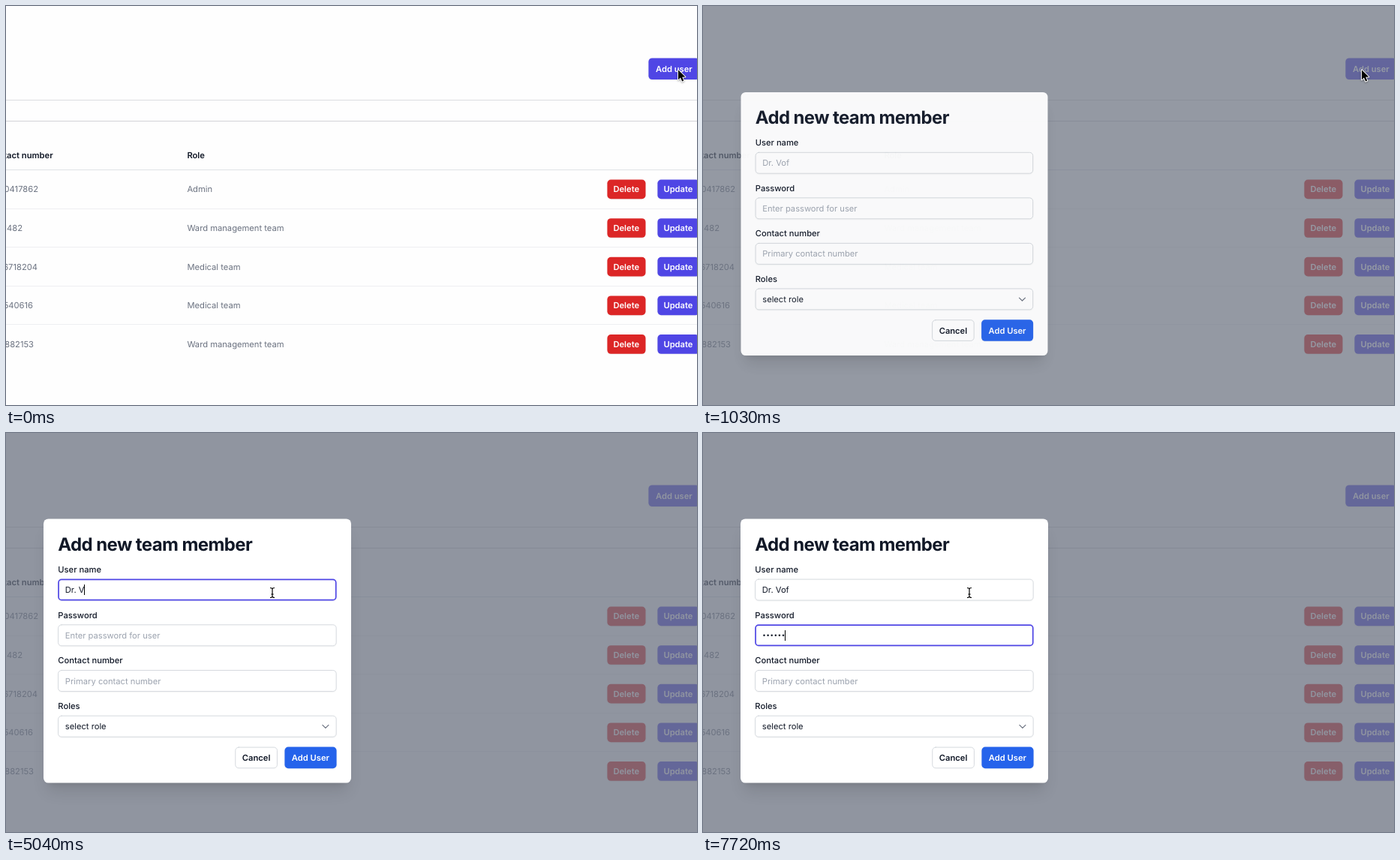
These frames come from a looping animation (921x532 px, 8 s). An HTML page with a canvas:

```html
<!DOCTYPE html>
<html lang="en">
<head>
<meta charset="utf-8">
<title>Add team member</title>
<style>
  html, body { margin: 0; width: 100%; height: 100%; overflow: hidden; background: #fefefe; }
  canvas { display: block; width: 921px; height: 532px; }
</style>
</head>
<body>
<canvas id="stage"></canvas>
<script>
const W = 921, H = 532, LOOP = 8000;
const dpr = window.devicePixelRatio || 1;
const INK = '#111827', MUTED = '#6b7280', HINT = '#9ca3af', EDGE = '#d1d5db';
const INDIGO = '#4f46e5', HOVER = '#6366f1', RED = '#dc2626', BLUE = '#2563eb';
const PAPER = '#fefefe';
const NAME = 'Dr. Vof';

const stage = document.getElementById('stage');
const layer = document.createElement('canvas');
for (const c of [stage, layer]) {
  c.width = Math.round(W * dpr);
  c.height = Math.round(H * dpr);
}
const view = stage.getContext('2d');
const sheet = layer.getContext('2d');
let g = view;

const rows = [
  ['70417862', 43, 'Admin'],
  ['1482', 22, 'Ward management team'],
  ['6718204', 42, 'Medical team'],
  ['2540616', 36, 'Medical team'],
  ['9882153', 37, 'Ward management team']
];

// Each track is [time, value]; the value holds until the next time.
const hoverOn = [[0, false], [140, true], [880, false]];
const opening = [[0, 0], [880, 0.66], [1030, 0.95], [1180, 1]];
const pointer = [
  [0, [896, 85.2]], [140, [891, 87]], [290, [882, 86]], [440, [878, 85.2]],
  [1180, [862, 92]], [1330, [735, 140]], [1480, [545, 198]], [1620, [410, 227]],
  [1770, [359, 231]], [1920, [357, 219]], [2070, [356, 215]], [2220, [355, 213]]
];
const nameLength = [[0, 0], [3410, 1], [3710, 2], [3860, 3], [4900, 4], [5040, 5], [5340, 6], [5640, 7]];
const dotCount = [[0, 0], [6530, 1], [6680, 2], [7120, 3], [7270, 4], [7720, 6]];
const focused = [[0, -1], [2520, 0], [5940, 1]];
const caretOn = [
  [0, false], [2520, true], [3120, false], [3410, true], [4300, false],
  [4900, true], [6380, false], [6530, true]
];

function at(track, t) {
  let value = track[0][1];
  for (const [time, v] of track) if (t >= time) value = v;
  return value;
}

function text(str, x, y, color, weight = 400, size = 11.2, align = 'left', spacing = 0) {
  g.font = `${weight} ${size}px Inter, "Liberation Sans", sans-serif`;
  g.letterSpacing = spacing + 'px';
  g.textAlign = align;
  g.fillStyle = color;
  g.fillText(str, x, y);
  return g.measureText(str).width;
}

function box(x, y, w, h, r, fill) {
  g.beginPath();
  g.roundRect(x, y, w, h, r);
  g.fillStyle = fill;
  g.fill();
}

// Border drawn inside the box edge.
function ring(x, y, w, h, r, width, color) {
  g.beginPath();
  g.roundRect(x + width / 2, y + width / 2, w - width, h - width, r - width / 2);
  g.lineWidth = width;
  g.strokeStyle = color;
  g.stroke();
}

function shadow(color, blur, dy) {
  g.shadowColor = color;
  g.shadowBlur = blur * dpr;
  g.shadowOffsetY = dy * dpr;
}

function rule(y, h, color) {
  g.fillStyle = color;
  g.fillRect(0, y, W, h);
}

function button(x, y, w, h, fill, label, textX, baseline) {
  g.save();
  shadow('rgba(0,0,0,.06)', 1.6, 0.8);
  box(x, y, w, h, 4.8, fill);
  g.restore();
  text(label, textX, baseline, '#fff', 600);
}

function drawPage(t) {
  g.fillStyle = PAPER;
  g.fillRect(0, 0, W, H);
  button(856.4, 69.4, 67.6, 28.7, at(hoverOn, t) ? HOVER : INDIGO, 'Add user', 866, 88);
  rule(125, 1, '#dcdde1');
  rule(153, 1, '#d2d3d8');
  text('Contact number', 62.6, 203, INK, 600, 11.2, 'right');
  text('Role', 241.4, 203, INK, 600);
  rule(218, 0.8, '#d8dbe0');
  rows.forEach(([phone, right, role], i) => {
    const y = 244.4 + i * 51.65;
    text(phone, right, y + 4, MUTED, 400, 11.2, 'right');
    text(role, 241.4, y + 4, MUTED);
    button(801.4, y - 12.9, 51.1, 25.7, RED, 'Delete', 809.4, y + 4);
    button(868.4, y - 12.9, 55.6, 25.7, INDIGO, 'Update', 876.4, y + 4);
    if (i < 4) rule(Math.floor(y + 25.6), 1, '#eeeff2');
  });
}

function drawField(i, label, active) {
  const y = 194.6 + i * 60.7;
  text(label, 69.3, y - 8.8, INK, 500);
  g.save();
  shadow('rgba(0,0,0,.05)', 1.6, 0.8);
  box(69.2, y, 371.4, 28.9, 4.8, '#fff');
  g.restore();
  ring(69.2, y, 371.4, 28.9, 4.8, active ? 1.7 : 0.9, active ? INDIGO : EDGE);
  return y + 18.5;
}

function drawCaret(x, baseline) {
  g.fillStyle = '#000';
  g.fillRect(Math.round(x), Math.round(baseline - 11), 1, 14);
}

function drawPanel(t) {
  const focus = at(focused, t), caret = at(caretOn, t);
  const typed = NAME.slice(0, at(nameLength, t));
  const dots = at(dotCount, t);

  for (const [inset, blur, dy] of [[4, 20, 16], [4.8, 8, 6.4]]) {
    g.save();
    shadow('rgba(0,0,0,.1)', blur, dy);
    box(50 + inset, 114.5 + inset, 410 - 2 * inset, 352 - 2 * inset, 6.4, '#fff');
    g.restore();
  }
  box(50, 114.5, 410, 352, 6.4, '#fff');
  text('Add new team member', 69.3, 157, INK, 700, 24, 'left', -0.6);

  let base = drawField(0, 'User name', focus === 0);
  const width = text(typed || NAME, 78.8, base, typed ? INK : HINT);
  if (focus === 0 && caret) drawCaret(78.8 + (typed ? width : 0), base);

  base = drawField(1, 'Password', focus === 1);
  if (!dots) text('Enter password for user', 78.8, base, HINT);
  g.fillStyle = INK;
  for (let i = 0; i < dots; i++) {
    g.beginPath();
    g.arc(81.5 + i * 5.1, base - 4, 1.25, 0, Math.PI * 2);
    g.fill();
  }
  if (focus === 1 && caret) drawCaret(78.8 + dots * 5.1, base);

  base = drawField(2, 'Contact number', false);
  text('Primary contact number', 78.8, base, HINT);

  base = drawField(3, 'Roles', false);
  text('select role', 78.8, base, INK);
  g.beginPath();
  g.moveTo(421.9, 389.3);
  g.lineTo(425.9, 393.3);
  g.lineTo(429.9, 389.3);
  g.lineWidth = 1.2;
  g.lineCap = g.lineJoin = 'round';
  g.strokeStyle = MUTED;
  g.stroke();

  ring(305.3, 418.6, 56.6, 28.6, 4.8, 0.9, EDGE);
  text('Cancel', 333.6, 437, INK, 600, 11.2, 'center');
  button(371.4, 418.6, 69.2, 28.6, BLUE, 'Add User', 380.8, 437);
}

function drawArrow() {
  g.beginPath();
  g.moveTo(0, 0);
  for (const [x, y] of [[0, 13], [3, 10.4], [5.2, 15.3], [7.3, 14.4], [5.2, 9.6], [9.4, 9.4]]) g.lineTo(x, y);
  g.closePath();
  g.save();
  shadow('rgba(0,0,0,.35)', 2.5, 1);
  g.lineWidth = 2;
  g.lineJoin = 'round';
  g.strokeStyle = '#fff';
  g.stroke();
  g.restore();
  g.fillStyle = '#000';
  g.fill();
}

function drawBeam() {
  g.beginPath();
  for (const s of [-1, 1]) {
    g.moveTo(-3, 6.5 * s);
    g.quadraticCurveTo(0, 6.5 * s, 0, 4.8 * s);
    g.quadraticCurveTo(0, 6.5 * s, 3, 6.5 * s);
  }
  g.moveTo(0, -5.5);
  g.lineTo(0, 5.5);
  g.moveTo(-1.6, 2);
  g.lineTo(1.6, 2);
  for (const [width, color] of [[2.8, '#fff'], [1.2, '#000']]) {
    g.lineWidth = width;
    g.strokeStyle = color;
    g.stroke();
  }
}

function reset(ctx) {
  g = ctx;
  g.setTransform(dpr, 0, 0, dpr, 0, 0);
  g.globalAlpha = 1;
  g.fontKerning = 'normal';
  g.textRendering = 'geometricPrecision';
  g.clearRect(0, 0, W, H);
}

function draw(t) {
  const open = at(opening, t);
  if (open) {
    reset(sheet);
    const k = 0.95 + 0.05 * open;
    g.translate(255, 290.5);
    g.scale(k, k);
    g.translate(-255, -290.5);
    drawPanel(t);
  }
  reset(view);
  drawPage(t);
  if (open) {
    g.fillStyle = `rgba(107,114,128,${0.75 * open})`;
    g.fillRect(0, 0, W, H);
    g.globalAlpha = open;
    g.drawImage(layer, 0, 0, W, H);
    g.globalAlpha = 1;
  }
  g.translate(...at(pointer, t));
  if (t < 1920) drawArrow();
  else drawBeam();
}

const start = performance.now();
function frame() {
  draw((performance.now() - start) % LOOP);
  requestAnimationFrame(frame);
}
frame();
</script>
</body>
</html>
```
